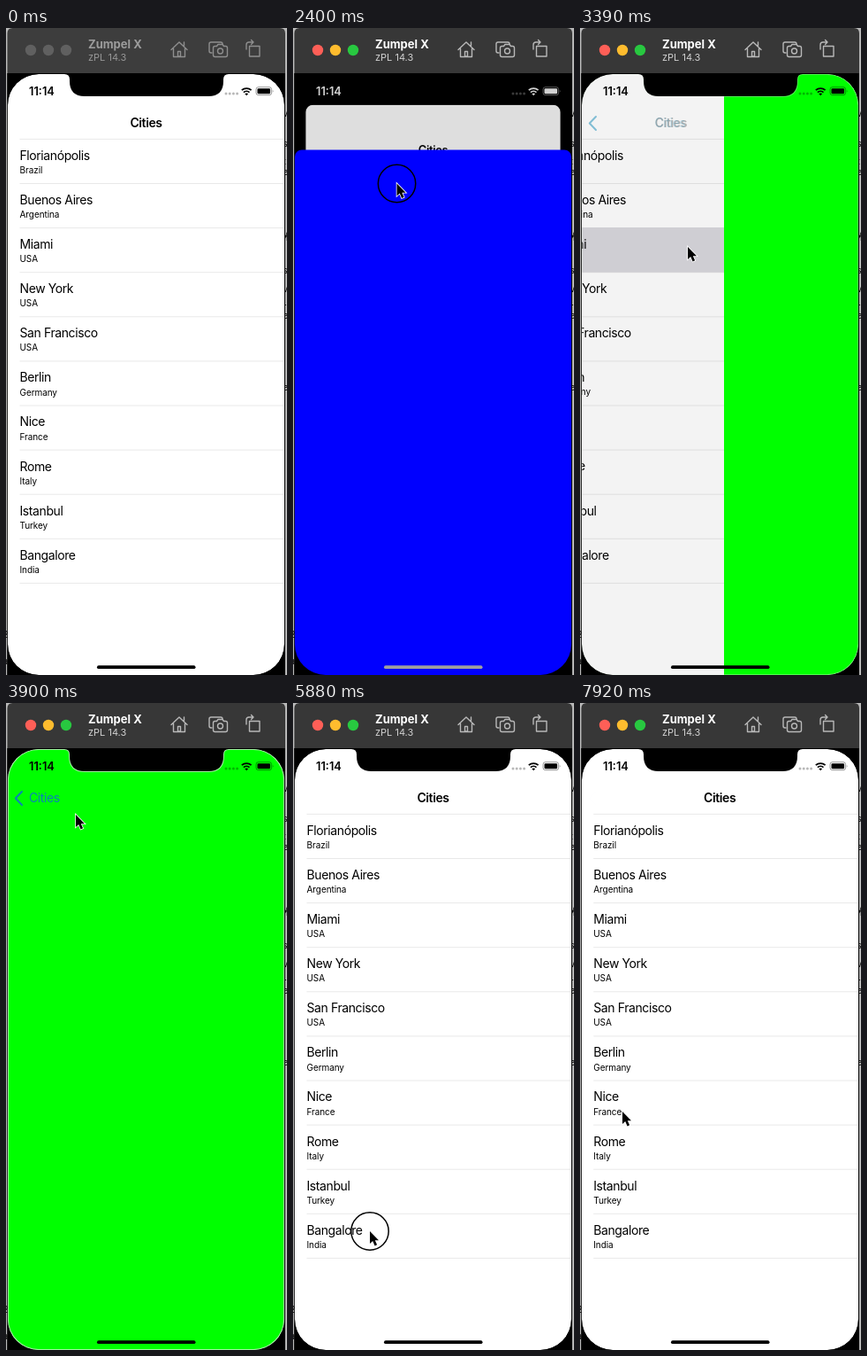
Write an HTML page that moves like this. It is 318 by 730 pixels and loops after 8 s.

```html
<!DOCTYPE html>
<html lang="en">
<head>
<meta charset="utf-8">
<title>Cities</title>
<style>
  html, body { margin: 0; width: 100%; height: 100%; overflow: hidden; background: #b8b8b8; }
  svg { display: block; width: 100%; height: 100%; font-family: Inter, "Liberation Sans", sans-serif; }
  .city, .nav { font-size: 14px; letter-spacing: -.4px; }
  .nation { font-size: 10px; letter-spacing: -.08px; }
  .title { font-weight: 600; text-anchor: middle; }
  .line { stroke: #e9e9e9; }
  .icon { fill: none; stroke-width: 1.4; stroke-linejoin: round; stroke-linecap: round; }
</style>
</head>
<body>
<svg viewBox="0 0 318 730" preserveAspectRatio="none">
  <defs>
    <clipPath id="screen"><rect x="2" y="52" width="313" height="678" rx="35"/></clipPath>
    <clipPath id="cardClip"><rect id="cardShape" x="2" y="52" width="313" height="678"/></clipPath>
  </defs>

  <g id="desk" font-size="10"></g>
  <rect x="1.2" y="51" width="314.8" height="679"/>

  <g id="bar">
    <path id="barBack" d="M1.5 51V6q0-6 6-6H310q6 0 6 6V51z"/>
    <g id="lights"></g>
    <text id="device" x="93" y="23" font-size="13" font-weight="700">Zumpel X</text>
    <text id="system" x="93" y="37" font-size="11">zPL 14.3</text>
    <g id="tools" class="icon">
      <path d="M187 24.5L196 16l9 8.5M189.5 23v9.5h13V23M201.5 20v-4M194.5 32v-5.5h3V32z"/>
      <path d="M233 28h-1q-2 0-2-2v-8q0-2 2-2h11q2 0 2 2"/>
      <path d="M236.5 20.5h2l1.500-2h5l1.500 2h2q2 0 2 2v8q0 2-2 2h-12q-2 0-2-2v-8q0-2 2-2z"/>
      <circle cx="242.5" cy="26" r="3"/>
      <path d="M275.5 20.5h11.5v11.5h-11.5zM272 24v-5q0-3 3-3h5M277.500 13.500l2.500 2.500-2.500 2.500"/>
    </g>
  </g>

  <g clip-path="url(#screen)">
    <rect y="52" width="318" height="678"/>
    <g id="card"><g clip-path="url(#cardClip)">
      <rect y="52" width="318" height="678" fill="#fff"/>
      <g id="list"></g>
      <rect id="listDim" y="52" width="318" height="678"/>
      <rect id="page" x="2" y="52" width="314" height="678"/>
      <text id="title" class="nav title" x="158.5" y="112">Cities</text>
      <path id="chevron" class="icon" style="stroke-width:2" d="M18 100l-7.200 7.500 7.200 7.500"/>
      <text id="back" class="nav" x="26" y="112">Cities</text>
    </g></g>
    <rect id="dim" y="52" width="318" height="678"/>
    <rect id="sheet" x="2" width="313" height="720" rx="8" fill="#00f"/>
    <g id="edge" fill="none" stroke="#e8f4e8" stroke-width="2">
      <rect x="2" y="52" width="313" height="678" rx="35"/>
      <use href="#notch"/>
    </g>
    <path id="notch" d="M66 51v1q6 0 6 6v2q0 17 17 17H229q17 0 17-17v-2q0-6 6-6v-1z" style="stroke:inherit"/>
    <g id="status" fill="currentColor">
      <text x="26" y="76" font-size="12.8" font-weight="600">11:14</text>
      <path d="M249 74h13" stroke="currentColor" stroke-width="3" stroke-linecap="round"
            stroke-dasharray="0 4.200" opacity=".28"/>
      <path d="M266.800 70.200a7.800 7.800 0 0 1 10.800 0M268.900 72.600a4.800 4.800 0 0 1 6.600 0"
            fill="none" stroke="currentColor" stroke-width="1.7"/>
      <path d="M272.200 76.200l-1.900-2q1.900-1.600 3.800 0z"/>
      <rect x="283" y="66.7" width="17.6" height="9" rx="2.6" fill="none" stroke="currentColor" opacity=".4"/>
      <rect x="284.5" y="68.2" width="14.6" height="6" rx="1.3"/>
      <path d="M301.800 69.800q1.500 1.400 0 2.900z" opacity=".5"/>
    </g>
    <rect id="home" x="103" y="719.3" width="111.5" height="3.8" rx="1.9"/>
  </g>

  <circle id="ring" r="21.2" fill="none" stroke="#000" stroke-width="1.5"/>
  <path id="cursor" d="M0 0V14L3.200 11l2.400 5.400 2.500-1.100L5.800 10.200H10z"
        stroke="#fff" stroke-width="1.6" paint-order="stroke"/>
</svg>

<script>
const LOOP = 8000;
const HOLD = 90;      // length of a click
const TRAVEL = 633;   // height of the open sheet
const $ = id => document.getElementById(id);
const set = (id, attrs) => {
  for (const k in attrs) $(id).setAttribute(k, attrs[k]);
};

const cities = [
  'Florianópolis, Brazil', 'Buenos Aires, Argentina', 'Miami, USA', 'New York, USA',
  'San Francisco, USA', 'Berlin, Germany', 'Nice, France', 'Rome, Italy',
  'Istanbul, Turkey', 'Bangalore, India'
];
const PITCH = 50.1;
const line = (y, id = '') => `<path class="line" ${id} d="M15.5 ${y}H316"/>`;

$('list').innerHTML = line(125.4, 'id="topLine"') + cities.map((entry, i) => {
  const y = 125.4 + PITCH * i;
  const [city, nation] = entry.split(', ');
  return line(y + PITCH) +
    `<rect id="row${i}" y="${y - .5}" width="318" height="50.6" fill="#d9d8dd" opacity="0"/>` +
    `<text class="city" x="15.5" y="${y + 23.4}">${city}</text>` +
    `<text class="nation" x="15.5" y="${y + 38.6}">${nation}</text>`;
}).join('');

const lights = ['#fe5f57', '#febc2e', '#28c840'];
$('lights').innerHTML = lights.map((c, i) => `<circle cx="${28 + 20 * i}" cy="25" r="6.2"/>`).join('');

// Slivers of text from the window behind
let seed = 7;
const random = () => (seed = seed * 16807 % 2147483647) / 2147483647;
$('desk').innerHTML = [...'vetsryeelnvs'].map(ch =>
  `<text x="313.5" y="${100 + 350 * random() ** 1.5}">${ch}</text>`).join('') +
  '<text x="-3.5" y="688">2</text><text x="-3.5" y="718">a</text>';

// Each visit opens from a row and closes again
const modal = { row: 0, open: 1350, close: 2490, grab: 180 };
const pushes = [
  { row: 2, open: 3300, close: 4110, fill: '#0f0', tint: '#0a84b4' },
  { row: 9, open: 5970, close: 7470, fill: '#fff', tint: '#147ae8' }
];
const presses = [modal, ...pushes].flatMap(v => [[v.open - HOLD, v.open], [v.close - (v.grab || HOLD), v.close]]);

// Cursor legs: start, end, target x, y
const legs = [
  [180, 330, 169, 266], [540, 840, 70, 141], [1560, 1950, 115, 135],
  [2340, 2490, 122, 247], [3480, 3900, 79, 126], [3900, 4020, 45, 109],
  [4200, 4740, 96, 369], [5070, 5190, 90, 586], [5430, 5550, 87, 596],
  [6060, 6420, 60, 200], [6630, 7020, 48, 109], [7530, 7890, 48, 461]
];

const clamp = u => Math.min(1, Math.max(0, u));
const smooth = u => u * u * (3 - 2 * u);
const spring = (ms, w) => {
  const x = Math.max(0, ms) / 1000 * w;
  return 1 - (1 + x) * Math.exp(-x);
};

function cursorAt(t) {
  return legs.reduce(([x, y], [from, to, tx, ty]) => {
    const u = smooth(clamp((t - from) / (to - from)));
    return [x + (tx - x) * u, y + (ty - y) * u];
  }, [203, 722]);
}

// The sheet follows the cursor while it is dragged, then falls away
function sheetAt(t) {
  const grabbed = modal.close - modal.grab;
  if (t < grabbed) return spring(t - modal.open, 16);
  const drag = cursorAt(Math.min(t, modal.close))[1] - cursorAt(grabbed)[1];
  return (1 - drag / TRAVEL) * (1 - spring(t - modal.close, 20));
}

const pushAt = (v, t) => t < v.close ? spring(t - v.open, 18) : 1 - spring(t - v.close, 18);
const glowAt = (v, t, progress) => t < v.open ? 0 : t < v.close ? 1 : progress;
const gray = v => `rgb(${v},${v},${v})`;

function draw(t) {
  const [cx, cy] = cursorAt(t);
  const visit = pushes[t < 5000 ? 0 : 1];
  const p = sheetAt(t);
  const q = pushAt(visit, t);
  const active = t >= modal.open - HOLD;

  lights.forEach((c, i) => $('lights').children[i].setAttribute('fill', active ? c : '#606060'));
  set('barBack', { fill: active ? '#373737' : '#3d3d3d' });
  set('device', { fill: active ? '#fff' : '#9c9c9c' });
  set('system', { fill: active ? '#cfcfcf' : '#969696' });
  set('tools', { stroke: active ? '#b8b8b8' : '#8e8e8e' });

  // Sheet and the card shrinking behind it
  set('card', { transform: `translate(158.5 ${52 + 37 * p}) scale(${1 - .085 * p}) translate(-158.5 -52)` });
  set('cardShape', { rx: 9 + 26 * (1 - p) ** 2 });
  set('dim', { opacity: .14 * p });
  set('sheet', { y: 730 - TRAVEL * p });
  set('status', { color: gray(Math.round(255 * p ** 3)) });
  set('home', { fill: gray(Math.round(170 * p)) });

  // Push and pop
  set('list', { transform: `translate(${-94 * q} 0)` });
  set('listDim', { opacity: .1 * q });
  set('page', { fill: visit.fill, transform: `translate(${314 * (1 - q)} 0)` });
  set('edge', { opacity: .7 * q });
  set('title', { opacity: clamp(1 - 1.5 * q), transform: `translate(${-114 * q} 0)` });
  set('back', { opacity: clamp(1.5 * q - .5), fill: visit.tint, transform: `translate(${114 * (1 - q)} 0)` });
  set('chevron', { opacity: q, stroke: visit.tint });

  set('row' + modal.row, { opacity: glowAt(modal, t, p) });
  for (const v of pushes) set('row' + v.row, { opacity: glowAt(v, t, pushAt(v, t)) });
  set('topLine', { opacity: p > .001 ? 0 : 1 });

  const at = `translate(${cx} ${cy})`;
  set('cursor', { transform: at, opacity: t < legs[0][0] ? 0 : 1 });
  set('ring', { transform: at, opacity: presses.some(([a, b]) => t >= a && t < b) ? 1 : 0 });
}

const start = performance.now();
(function tick() {
  draw((performance.now() - start) % LOOP);
  requestAnimationFrame(tick);
})();
</script>
</body>
</html>
```
